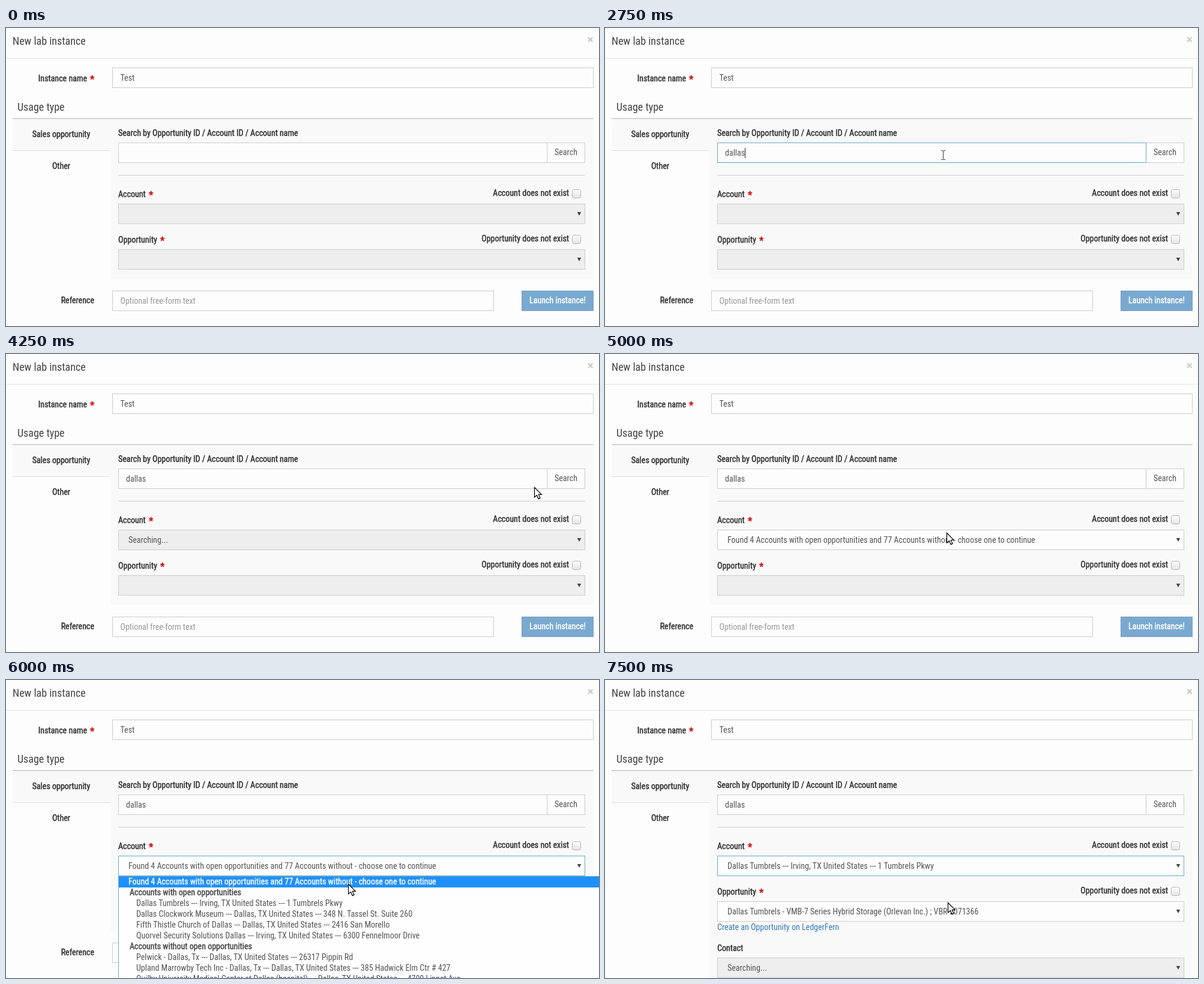
An HTML page for the animation above (8000 ms loop, 988x497 px).

```html
<!DOCTYPE html>
<html lang="en">
<head>
<meta charset="utf-8">
<title>New lab instance</title>
<style>
  html, body { margin: 0; width: 100%; height: 100%; overflow: hidden; background: #fdfdfd; }
  svg { display: block; width: 988px; height: 497px; }
  text { font: 14px "Roboto Condensed", Roboto, sans-serif; font-stretch: 75%; fill: currentColor; color: #555; white-space: pre; }
  text.wide { font-family: Roboto, sans-serif; font-stretch: 100%; }
  .label { color: #333; stroke: currentColor; stroke-width: .45px; }
  .group { color: #484848; stroke: currentColor; stroke-width: .45px; }
  .title { font-size: 18px; color: #444; }
  .star { font-size: 16.5px; color: #d01010; stroke: currentColor; stroke-width: .7px; }
  .hint { color: #999; }
  .link { color: #337ab7; }
  .picked { color: #fff; stroke: currentColor; stroke-width: .35px; }
  .launch { color: #fff; stroke: currentColor; stroke-width: .45px; }
</style>
</head>
<body>
<svg viewBox="0 0 988 497">
  <defs>
    <linearGradient id="shade" x2="0" y2="1">
      <stop stop-color="#fdfdfd"/><stop offset="1" stop-color="#e4e4e4"/>
    </linearGradient>
  </defs>
  <text id="probe" visibility="hidden"></text>
  <g id="scene"></g>
</svg>
<script>
const LOOP = 8000, STEP = 250;
const GREY = '#ccc', BLUE = '#68abc8', PAGE = '#fdfdfd', PANEL = '#f9f9f9', OFF = '#eee';
const scene = document.getElementById('scene'), probe = document.getElementById('probe');

const FOUND = 'Found 4 Accounts with open opportunities and 77 Accounts without - choose one to continue';
const TEAM = 'Dallas Tumbrels --- Irving, TX United States --- 1 Tumbrels Pkwy';
const OPTIONS = [
  FOUND,
  '#Accounts with open opportunities',
  TEAM,
  'Dallas Clockwork Museum --- Dallas, TX United States --- 348 N. Tassel St. Suite 260',
  'Fifth Thistle Church of Dallas --- Dallas, TX United States --- 2416 San Morello',
  'Quorvel Security Solutions Dallas --- Irving, TX United States --- 6300 Fennelmoor Drive',
  '#Accounts without open opportunities',
  'Pelwick - Dallas, Tx --- Dallas, TX United States --- 26317 Pippin Rd',
  'Upland Marrowby Tech Inc - Dallas, Tx --- Dallas, TX United States --- 385 Hadwick Elm Ctr # 427',
  'Quilby University Medical Center at Dallas (hospital) --- Dallas, TX United States --- 4700 Linnet Ave'
];

const POINTERS = {
  arrow: '<path d="M.5.5v16.500l3.900-3.500 2.800 6.100 2.800-1.200-2.700-6h5z" fill="#fff" stroke="#000" stroke-width="1.200"/>',
  beam: '<path d="M0 .5h2.500q1 0 1 1v13q0 1-1 1H0M7 .5H4.500q-1 0-1 1v13q0 1 1 1H7" fill="none" stroke="#333"/>',
  hand: '<path d="M5.500 14V3q0-2 1.800-2t1.800 2v6q2.700-1.200 3 .8 2.500-1 2.800 1 2.300-.6 2.300 1.700v4.500l-1.700 4.500v2.500H7v-2.500L1.500 15q-1.500-2.700 0-3.400 1.500-.6 4 2.400zM9.100 9v4M12.100 10v3M14.900 11v2.500" fill="#fff" stroke="#000" stroke-width="1.200"/>'
};

// time, pointer, x, y: each pose holds until the next
const MOVES = [
  [0], [250, 'arrow', 244, 476], [500, 'arrow', 330, 405], [750, 'arrow', 430, 310],
  [1000, 'arrow', 538, 150], [1250, 'beam', 545, 202], [1500],
  [2750, 'beam', 560, 204], [3000, 'beam', 700, 200], [3250, 'arrow', 860, 178],
  [3500, 'hand', 925, 199], [4250, 'arrow', 880, 222], [4500, 'arrow', 760, 265],
  [4750, 'arrow', 620, 297], [5000, 'arrow', 569, 298], [6000, 'arrow', 570, 340],
  [6250, 'arrow', 571, 381], [6500, 'arrow', 571, 371]
];

function width(s, kind = '') {
  probe.setAttribute('class', kind);
  probe.textContent = s;
  return probe.getComputedTextLength();
}
// One ratio for all text when no condensed face is available
const squeeze = width(FOUND) / width(FOUND, 'wide') > .95 ? .887 : 1;

const text = (x, y, s, kind = '', anchor = 'start') =>
  `<text class="${kind}" text-anchor="${anchor}" transform="translate(${x} ${y}) scale(${squeeze} 1)">${s}</text>`;
const fill = (x, y, w, h, color) => `<rect x="${x}" y="${y}" width="${w}" height="${h}" fill="${color}"/>`;
const box = (x, y, w, h, color = PAGE, edge = GREY) =>
  `<rect x="${x + .5}" y="${y + .5}" width="${w - 1}" height="${h - 1}" fill="${color}" stroke="${edge}"/>`;
const star = (x, y) => text(x, y, '*', 'star');

const select = (y, s, enabled, edge) =>
  box(187, y, 778, 34, enabled ? PAGE : OFF, edge) + text(204, y + 22, s) +
  `<path d="M951.700 ${y + 14}h6.600l-3.300 6z" fill="#444"/>`;

const check = (y, s) => text(938, y, s, 'label', 'end') +
  `<rect x="943.500" y="${y - 10.5}" width="14" height="14" rx="3" fill="url(#shade)" stroke="#b4b4b4"/>`;

function frame(chosen) {
  return fill(0, 0, 988, 497, PAGE) +
    text(11, 28, 'New lab instance', 'title') +
    '<path d="M970 15.500l7.500 7.500m0-7.500l-7.500 7.500" stroke="#c6c6c6" stroke-width="2"/>' +
    fill(0, 50, 988, 1, '#e5e5e5') +
    text(135, 89, 'Instance name', 'label', 'end') + star(140, 91) +
    box(177, 66, 802, 34) + text(190.5, 88, 'Test') +
    text(19, 138, 'Usage type', 'title') +
    fill(11, 152, 163, 53, PANEL) + fill(174, 152, 805, chosen ? 345 : 266, PANEL) +
    fill(11, 150, 968, 2, '#d4d4d4') + fill(11, 204, 163, 1, '#ddd') +
    text(92, 182, 'Sales opportunity', 'label', 'middle') +
    text(92, 235, 'Other', 'label', 'middle');
}

function search(t) {
  const focused = t >= 1500 && t < 4000, hover = t >= 3500 && t < 4250;
  const typed = 'dallas'.slice(0, t < 1750 ? 0 : (t - 1750) / STEP * 2 + 1);
  let out = text(187, 180, 'Search by Opportunity ID / Account ID / Account name', 'label') +
    box(901, 191, 64, 34, hover ? '#e6e6e6' : PAGE, hover ? '#adadad' : GREY) +
    text(914, 212, 'Search') +
    box(187, 191, 715, 34, PAGE, focused ? BLUE : GREY) + text(200, 213, typed);
  if (focused && t < 3000) out += fill(Math.round(200 + width(typed) * squeeze), 200, 1, 17, '#222');
  return out + fill(187, 245, 778, 1, GREY);
}

function account(t, chosen) {
  const found = t >= 4500;
  const value = chosen ? TEAM : found ? FOUND : t >= 3750 ? 'Searching...' : '';
  return text(187, 282, 'Account', 'label') + star(238, 284) + check(280, 'Account does not exist') +
    select(293, value, found, t >= 5250 ? BLUE : GREY);
}

function opportunity(chosen) {
  const out = text(187, 358, 'Opportunity', 'label') + star(257, 360) +
    check(356, 'Opportunity does not exist') +
    select(369, chosen ? 'Dallas Tumbrels - VMB-7 Series Hybrid Storage (Orlevan Inc.) ; VBR-2071366' : '', chosen);
  if (chosen) return out + text(187, 417, 'Create an Opportunity on LedgerFern', 'link') +
    text(187, 452, 'Contact', 'label') + select(463, 'Searching...', false);
  return out + text(147, 459, 'Reference', 'label', 'end') +
    box(177, 438, 636, 34) + text(190.5, 460, 'Optional free-form text', 'hint') +
    box(859, 438, 120, 34, '#7aa9d0', '#77a0c4') + text(919, 459, 'Launch instance!', 'launch', 'middle');
}

function menu(t) {
  const picked = t < 6250 ? 0 : t < 6500 ? 3 : 2;
  return box(187, 327, 820, 200, '#fefefe', BLUE) + OPTIONS.map((s, i) => {
    const y = 341 + i * 18;
    if (s[0] === '#') return text(206, y, s.slice(1), 'group');
    return (i === picked ? fill(188, y - 13, 800, 18, '#1e90ff') : '') +
      text(i ? 217 : 204, y, s, i === picked ? 'picked' : '');
  }).join('');
}

function pointer(t) {
  const [, kind, x, y] = MOVES.filter(m => m[0] <= t).pop();
  return kind ? `<g transform="translate(${x} ${y})">${POINTERS[kind]}</g>` : '';
}

let shown = -1;
function draw() {
  const t = Math.floor(performance.now() % LOOP / STEP) * STEP;
  if (t !== shown) {
    const chosen = t >= 7500, open = t >= 5250 && !chosen;
    scene.innerHTML = frame(chosen) + search(t) + account(t, chosen) + opportunity(chosen) +
      (open ? menu(t) : '') + pointer(t);
    shown = t;
  }
  requestAnimationFrame(draw);
}
draw();
</script>
</body>
</html>
```
